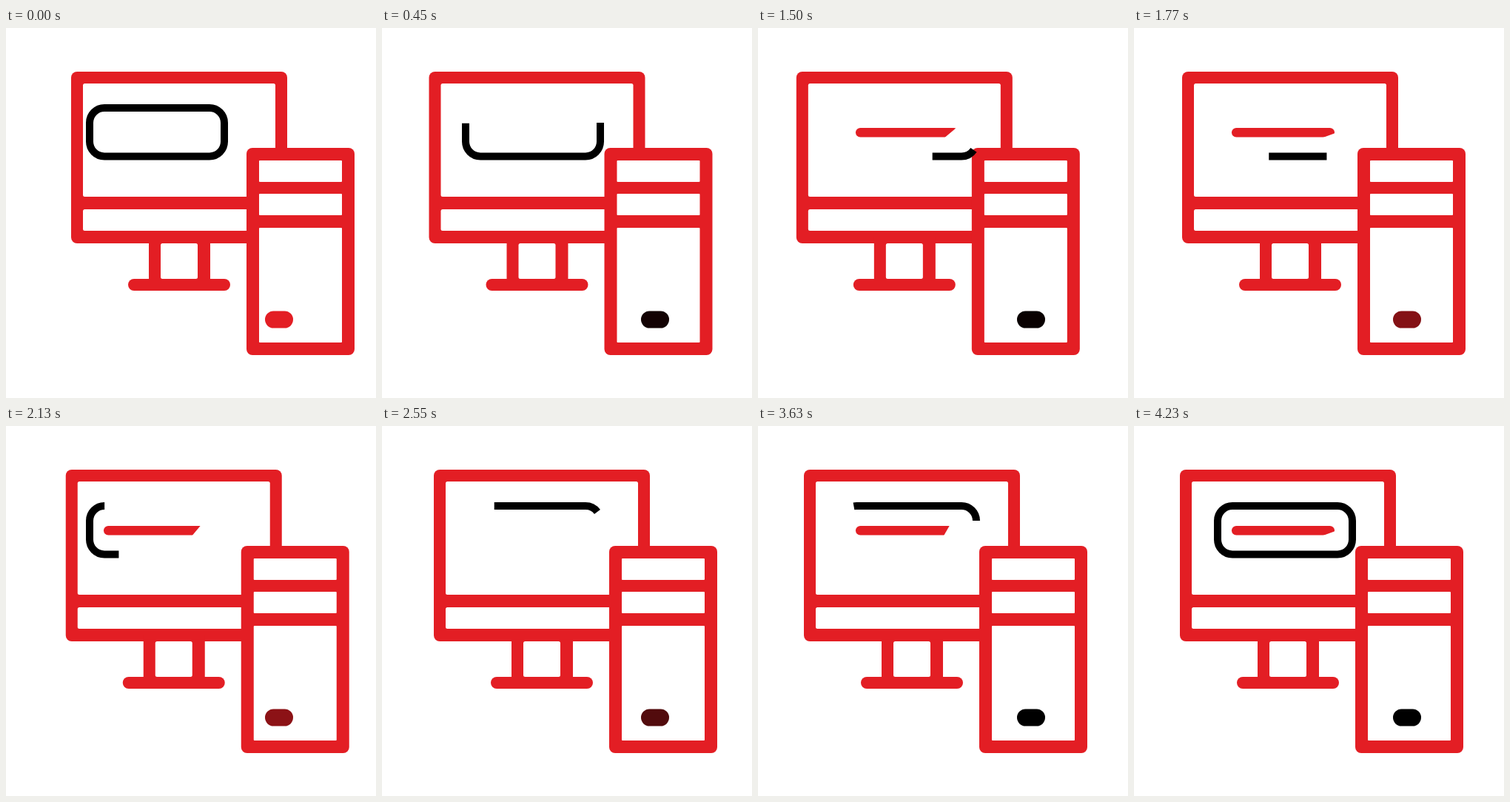
An HTML page that plays this animation: 500 by 500 pixels, repeating every 4980 ms.

```html
<!DOCTYPE html>
<html lang="en">
<head>
<meta charset="utf-8">
<title>Desktop computer</title>
<style>
  html, body { margin: 0; width: 100%; height: 100%; overflow: hidden; background: #fff; }
  svg { display: block; width: 100vw; height: 100vh; }
</style>
</head>
<body>
<svg viewBox="0 0 500 500">
  <defs>
    <clipPath id="wipe"><path id="sector"/></clipPath>
  </defs>
  <g id="computer" fill="#e31e24">
    <rect x="88" y="59" width="292" height="232" rx="8"/>
    <rect x="193" y="283" width="83" height="64"/>
    <rect x="165" y="339" width="138" height="16" rx="8"/>
    <g fill="#fff">
      <rect x="104" y="75" width="260" height="153" rx="2.5"/>
      <rect x="104" y="245" width="240" height="29" rx="2.5"/>
      <rect x="209" y="291" width="50" height="48" rx="2.5"/>
    </g>
    <rect x="325" y="162" width="146" height="280" rx="8"/>
    <g fill="#fff">
      <rect x="342" y="179" width="112" height="29" rx="1"/>
      <rect x="342" y="224" width="112" height="29" rx="1"/>
      <rect x="342" y="270" width="112" height="155" rx="1"/>
    </g>
  </g>
  <rect id="button" x="350" y="382.5" width="38" height="23" rx="11.5"/>
  <g clip-path="url(#wipe)">
    <rect x="132" y="135" width="139" height="12.5" rx="6.25" fill="#e31e24"/>
  </g>
  <path id="outline" pathLength="1" fill="none" stroke="#000" stroke-width="10"
    d="M295 128V153.5A20 20 0 0 1 275 173.5H133A20 20 0 0 1 113 153.5V128A20 20 0 0 1 133 108H275A20 20 0 0 1 295 128"/>
</svg>
<script>
const LOOP = 4980, STEP = 30;
const $ = id => document.getElementById(id);

// Keys are [time, value] pairs.
const slide = [[0, 88], [450, 63.5], [540, 61], [1080, 55], [1140, 54], [1350, 50], [1620, 55],
  [1770, 65], [2010, 83], [2160, 80], [2550, 70], [2700, 66], [3030, 62], [LOOP, 62]];
const glow = [[0, 1], [490, 0], [990, 1], [1480, 0], [1980, 1], [2370, 0], [2870, 1], [3240, 0]];
const trimStart = [[1200, 0], [1770, .155], [2550, .664], [3030, .873], [3255, 1], [4230, 0]];
const trimEnd = [[0, 1], [1009, 0], [1140, .054], [1770, .325], [2550, .972], [2610, 1]];
const sweep = [[1080, 0], [1560, 160], [2040, 160], [2520, 0], [3270, 0], [3750, 160]];

function segment(keys, t) {
  let i = 0;
  while (i < keys.length - 2 && t >= keys[i + 1][0]) i++;
  return i;
}

function linear(keys, t) {
  const i = segment(keys, t), [t0, a] = keys[i], [t1, b] = keys[i + 1];
  return a + (b - a) * Math.min(1, Math.max(0, (t - t0) / (t1 - t0)));
}

const slope = (keys, i) => (keys[i + 1][1] - keys[i][1]) / (keys[i + 1][0] - keys[i][0]);

// Harmonic mean keeps the curve from overshooting its keys.
function tangent(keys, i) {
  if (i === 0) return slope(keys, 0);
  if (i === keys.length - 1) return 0;
  const a = slope(keys, i - 1), b = slope(keys, i);
  return a * b > 0 ? 2 * a * b / (a + b) : 0;
}

function smooth(keys, t) {
  const i = segment(keys, t), [t0, a] = keys[i], [t1, b] = keys[i + 1];
  const d = t1 - t0, u = (t - t0) / d, v = 1 - u;
  return a * v * v * (1 + 2 * u) + b * u * u * (3 - 2 * u)
    + d * u * v * (v * tangent(keys, i) - u * tangent(keys, i + 1));
}

function sectorPath(degrees) {
  if (degrees <= 0) return "M0 0";
  const angle = Math.PI * (1 + degrees / 180);
  const x = 250 + 300 * Math.cos(angle), y = 150 + 300 * Math.sin(angle);
  return `M250 150H-50A300 300 0 0 1 ${x} ${y}Z`;
}

function draw(t) {
  $("computer").setAttribute("transform", `translate(${smooth(slide, t) - 88})`);

  const g = linear(glow, t);
  $("button").setAttribute("fill", `rgb(${[227, 30, 36].map(c => Math.round(c * g))})`);

  $("sector").setAttribute("d", sectorPath(linear(sweep, t)));

  const start = linear(trimStart, t), length = linear(trimEnd, t) - start;
  const outline = $("outline");
  outline.style.display = length > .001 ? "" : "none";
  outline.setAttribute("stroke-dasharray", length > .999 ? "none" : `0 ${start} ${length} 2`);
}

const origin = performance.now();
function tick() {
  const t = (performance.now() - origin) % LOOP;
  draw(Math.min(4230, Math.floor(t / STEP) * STEP));
  requestAnimationFrame(tick);
}
tick();
</script>
</body>
</html>
```
